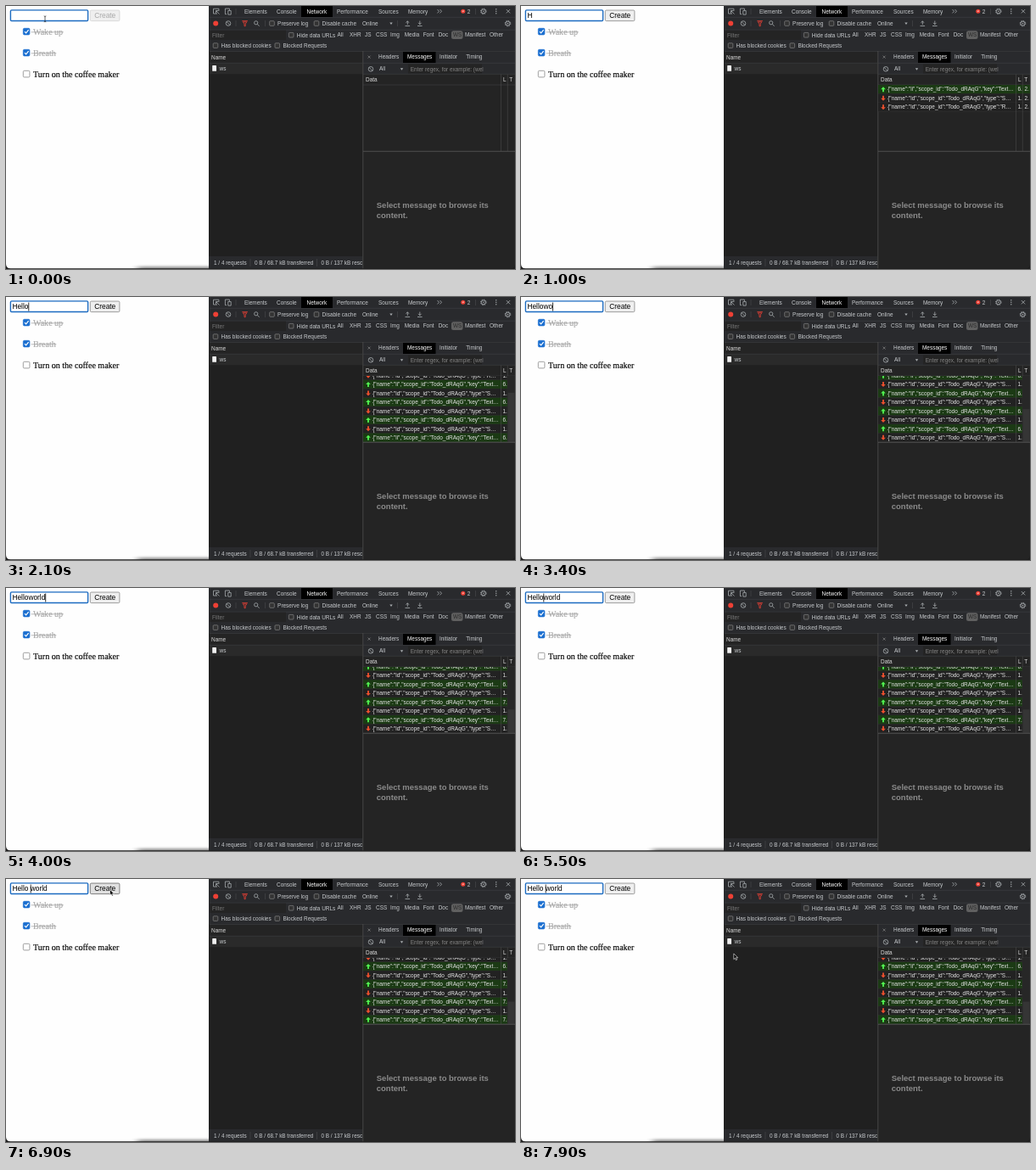
Write an HTML page that moves like this. It is 600 px wide and 310 px high and loops after 8000 ms.

```html
<!DOCTYPE html>
<html lang="en">
<head>
<meta charset="utf-8">
<title>Todo list with socket inspector</title>
<style>
html, body { margin: 0; width: 100%; height: 100%; overflow: hidden; background: #fff; }
svg { display: block; width: 600px; height: 310px; }
text { font-family: "Liberation Sans", Arial, sans-serif; white-space: pre; }
.serif { font-family: "Liberation Serif", Times, serif; }
</style>
</head>
<body>
<svg id="stage" viewBox="0 0 600 310">
  <defs>
    <clipPath id="listClip"><rect x="421" y="93" width="179" height="78"/></clipPath>
    <clipPath id="requestClip"><rect x="240" y="295" width="180" height="15"/></clipPath>
    <filter id="blur" x="-20%" y="-200%" width="140%" height="500%"><feGaussianBlur stdDeviation="4 1.8"/></filter>
  </defs>
</svg>
<script>
const LOOP = 8000, ROW = 10.45, LIST_TOP = 93, LIST_HEIGHT = 78, REPLY_DELAY = 80;
const TYPED = "Helloworld";
const KEY_TIMES = [500, 1600, 1700, 1900, 2100, 2900, 3300, 3850, 3880, 3915];
const LEFT_TIMES = [4700, 4800, 4900, 5200, 5500];
const SPACE_TIME = 5900;
const MOUSE = [[6500, 112, -1], [6700, 122.5, 12.5], [7000, 122.5, 12.5], [7700, 250.8, 88]];

const BAR = "#292a2d", PANE = "#242424", LINE = "#414245", ICON = "#a8acaf", TEXT = "#c8cbce";
const stage = document.getElementById("stage");

function add(tag, attrs, parent = stage) {
  const el = document.createElementNS("http://www.w3.org/2000/svg", tag);
  for (const key in attrs) el.setAttribute(key, attrs[key]);
  return parent.appendChild(el);
}
const rect = (x, y, width, height, fill, extra, parent) =>
  add("rect", { x, y, width, height, fill, ...extra }, parent);
const path = (d, stroke, extra, parent) =>
  add("path", { d, stroke, fill: "none", "stroke-width": .8, ...extra }, parent);
const circle = (cx, cy, r, extra) => add("circle", { cx, cy, r, ...extra });
function label(x, y, content, fill = TEXT, size = 6.45, extra, parent) {
  const el = add("text", { x, y, fill, "font-size": size, ...extra }, parent);
  el.textContent = content;
  return el;
}
const show = (el, on) => el.setAttribute("visibility", on ? "visible" : "hidden");

// Page with the todo list
rect(0, 0, 240, 310, "#fefefe");
rect(155, 307, 100, 8, "#000", { opacity: .4, filter: "url(#blur)" });
rect(5.4, 4.9, 91.2, 12.6, "#fff", { stroke: "#1b6ac0", "stroke-width": 1.4, rx: 1.2 });
const inputText = label(7.4, 14.2, "", "#000", 8.35);
const caret = rect(0, 6.5, .8, 10, "#000");
const button = rect(99.3, 5, 34.6, 12.6, "#efefef", { "stroke-width": .7, rx: 1.4 });
const buttonText = label(104.2, 14.2, "Create", "#000", 8.35);

function todo(y, content, strikeEnd) {
  const done = strikeEnd > 0, color = done ? "#a9a9a9" : "#000";
  rect(20.3, y - 3.7, 7.6, 7.6, done ? "#1b6fd0" : "#fff",
    { rx: 1.3, stroke: done ? "#1b6fd0" : "#767676", "stroke-width": .7 });
  label(32, y + 3.5, content, color, 10.04, { class: "serif", stroke: color, "stroke-width": .15 });
  if (!done) return;
  path(`M22 ${y + .2}l1.6 1.7 3-3.7`, "#fff", { "stroke-width": 1.2 });
  path(`M29.6 ${y + .8}H${strikeEnd}`, "#a0a0a0", { "stroke-width": .7 });
}
todo(30, "Wake up", 67.8);
todo(55, "Breath", 59.4);
todo(80, "Turn on the coffee maker", 0);

// Inspector panels
rect(239, 0, 361, 310, PANE);
rect(239, 0, 361, 53, BAR);
path("M240 13.3H600M240 28.2H600M240 53.5H600", LINE, { "stroke-width": .6 });
rect(239, 67.5, 181.5, 227.5, "#202020");
rect(240, 67.5, 180.5, 12.7, "#2a2a2a");
path("M240 67.3H420", LINE, { "stroke-width": .6 });
rect(239, 295, 181.5, 15, BAR);
rect(421, 54, 179, 26, BAR);
path("M421 67.3H600M421 80.3H600M421 93H600", LINE, { "stroke-width": .6 });
path("M420.8 53V310", "#505050");

// Main tabs
rect(348, 0, 37, 13, "#000");
[[281, "Elements"], [319, "Console"], [354.5, "Network"], [390, "Performance"],
 [439, "Sources"], [474, "Memory"]].forEach(([x, name]) =>
  label(x, 8.5, name, name === "Network" ? "#fff" : TEXT));

path("M249 9h-4.5V3.2h6.4V6M247.5 5.5l4 4M247.5 5.5v3M247.5 5.5h3", ICON);
path("M260 9.6h-1.6V3h5v2M261.8 5.5h3.4v4.6h-3.4z", ICON);
path("M271 3v7M271 17v7M305.5 17v7M461.5 17v7M553.5 3v7", "#4a4b4e", { "stroke-width": .6 });
path("M508.5 4l2 2.2-2 2.2M511.5 4l2 2.2-2 2.2", ICON);
circle(538.8, 6.2, 2.5, { fill: "#ee4035" });
path("M537.9 5.3l1.8 1.8M539.7 5.3l-1.8 1.8", "#fff", { "stroke-width": .5 });
label(543.7, 8.5, "2");
for (const y of [3.8, 6.3, 8.8]) circle(577.8, y, .7, { fill: ICON });
path("M589.8 4l4.4 4.4M594.2 4l-4.4 4.4", ICON);

function gear(x, y) {
  circle(x, y, 2.5, { fill: "none", stroke: ICON, "stroke-width": .9 });
  circle(x, y, 3.3, { fill: "none", stroke: ICON, "stroke-width": .9, "stroke-dasharray": "1.3 1.29" });
  circle(x, y, .8, { fill: ICON });
}
gear(562.8, 6.3);
gear(591.5, 20.6);

function blocked(x, y) {
  circle(x, y, 2.8, { fill: "none", stroke: ICON, "stroke-width": .8 });
  path(`M${x - 2} ${y - 2}l4 4`, ICON);
}
function checkOption(x, y, content) {
  rect(x - 2.8, y - 2.8, 5.6, 5.6, "#333", { stroke: "#949494", "stroke-width": .6, rx: .9 });
  label(x + 6.6, y + 2.3, content);
}
const dropMark = (x, y) => add("path", { d: `M${x - 1.7} ${y - 1}h3.4l-1.7 2.4z`, fill: ICON });

// Network toolbar
circle(247.2, 20.5, 3, { fill: "#ee4035" });
blocked(262, 20.5);
path("M278.3 17.6h6.6M279.3 18.9h4.6l-1.7 2v2.8h-1.2v-2.8z", "#ee4035");
circle(294.7, 19.8, 2.1, { fill: "none", stroke: ICON, "stroke-width": .8 });
path("M296.3 21.4l2.3 2.4", ICON);
checkOption(313.5, 20.5, "Preserve log");
checkOption(366, 20.5, "Disable cache");
label(420, 22.8, "Online");
dropMark(454, 20.5);
path("M470.5 23.5h5.6M473.3 22v-4M471.6 19.7l1.7-2 1.7 2", ICON);
path("M485 23.5h5.6M487.8 17.5v4M486.1 19.8l1.7 2 1.7-2", ICON);

// Filter bar
rect(240, 28.6, 90, 11.4, "#242424");
label(243, 36.6, "Filter", "#777");
checkOption(336.2, 34.2, "Hide data URLs");
rect(525, 29.3, 13.5, 9.6, "#606060", { rx: 2.5 });
[[390.5, "All"], [405, "XHR"], [423, "JS"], [436, "CSS"], [453, "Img"], [469.7, "Media"],
 [491.7, "Font"], [509.7, "Doc"], [527, "WS"], [541, "Manifest"], [570, "Other"]].forEach(([x, name]) =>
  label(x, 36.4, name, name === "WS" ? "#2a2a2a" : TEXT));
checkOption(247, 46.6, "Has blocked cookies");
checkOption(319.8, 46.6, "Blocked Requests");

// Request list
label(242, 62.8, "Name", "#dcdcdc");
rect(243.2, 70, 4.8, 6.8, "#f2f2f2", { rx: .4 });
label(251.5, 75.6, "ws");
const status = add("g", { "clip-path": "url(#requestClip)" });
[[245, "1 / 4 requests"], [293, "0 B / 68.7 kB transferred"], [371.5, "0 B / 137 kB resc"]]
  .forEach(([x, content]) => label(x, 304.7, content, TEXT, 6.4, {}, status));
path("M288 298v9M366.5 298v9", "#4a4b4e", { "stroke-width": .6 });

// Message pane
rect(468, 54, 38.5, 13, "#000");
path("M426.6 58.6l3 3M429.6 58.6l-3 3", "#8a8a8a", { "stroke-width": .7 });
[[439, "Headers"], [473, "Messages"], [511, "Initiator"], [542.3, "Timing"]].forEach(([x, name]) =>
  label(x, 62.3, name, name === "Messages" ? "#fff" : TEXT));
blocked(430, 74.3);
label(440, 76.4, "All");
dropMark(466.5, 74.3);
rect(474, 68.5, 87, 11, "#242424");
label(476.8, 76.6, "Enter regex, for example: (wel", "#858585");
label(424, 89.2, "Data", "#dcdcdc");
label(586, 89.2, "L", "#dcdcdc");
label(593.3, 89.2, "T", "#dcdcdc");

const list = add("g", {}, add("g", { "clip-path": "url(#listClip)" }));
const rows = [];
function addRow(sent, ending, size) {
  const y = LIST_TOP + ROW * rows.length, mid = y + ROW / 2;
  const row = add("g", {}, list);
  rect(421, y, 179, ROW, sent ? "#1b3a14" : "#222", {}, row);
  path(`M421 ${y + ROW}H600`, "#363636", { "stroke-width": .5 }, row);
  const color = sent ? "#52f552" : "#f0502e", dir = sent ? 1 : -1;
  add("path", { d: `M427 ${mid - 3 * dir}l2.8 ${3 * dir}h-1.9v${3 * dir}h-1.8v${-3 * dir}h-1.9z`, fill: color }, row);
  label(432.2, mid + 2.2, `{"name":"${sent ? "li" : "ld"}","scope_id":"Todo_dRAqG",${ending}…`, "#e4e4e4", 6.48, {}, row);
  label(585.4, mid + 2.2, size, "#e4e4e4", 6.45, {}, row);
  label(593.4, mid + 2.2, "2.", "#e4e4e4", 6.45, {}, row);
  rows.push(row);
}
for (let n = 1; n <= TYPED.length + 1; n++) {
  addRow(true, '"key":"Text', n > 8 ? "7." : "6.");
  if (n <= TYPED.length) addRow(false, '"type":"S', "1.");
  if (n === 1) addRow(false, '"type":"R', "1.");
}
path("M583.5 80.5V171M591.3 80.5V171", "#4a4a4a", { "stroke-width": .6 });
const scrollbar = add("g");
rect(591, LIST_TOP, 9, LIST_HEIGHT, "#272727", {}, scrollbar);
const thumb = rect(591.5, 0, 8, 0, "#353535", {}, scrollbar);
path("M421 171.3H600", "#5a5a5a");
for (const [y, content] of [[238.3, "Select message to browse its"], [249.8, "content."]])
  label(436.8, y, content, "#8b8b8b", 9.47, { "font-weight": "bold" });

// Rounded lower edge of the window
add("path", { d: "M0 304q0 5.3 5.3 5.3H594.7q5.3 0 5.3-5.3V310H0z", fill: "#1c1c1c" });

const beam = path("M44.7 11.8q1.3 0 1.3 1q0-1 1.3-1M46 12.8v5M44.7 18.8q1.3 0 1.3-1q0 1 1.3 1", "#222", { "stroke-width": .7 });
const arrow = add("path", { d: "M0 0v6.6l1.5-1.4 1.1 2.4 1.2-.5-1.1-2.4h2.1z", fill: "#000", stroke: "#fff", "stroke-width": .6 });

const passed = (times, t) => times.filter(time => time <= t).length;

function mouseAt(t) {
  for (let i = 1; i < MOUSE.length; i++) {
    const [t0, x0, y0] = MOUSE[i - 1], [t1, x1, y1] = MOUSE[i];
    if (t > t1) continue;
    const p = Math.max(0, (t - t0) / (t1 - t0)), e = p * p * (3 - 2 * p);
    return [x0 + (x1 - x0) * e, y0 + (y1 - y0) * e];
  }
  return MOUSE[MOUSE.length - 1].slice(1);
}

function render(t) {
  const keys = passed(KEY_TIMES, t), lefts = passed(LEFT_TIMES, t), spaced = t >= SPACE_TIME;
  const content = spaced ? "Hello world" : TYPED.slice(0, keys);
  const position = keys - lefts + spaced;
  if (inputText.textContent !== content) inputText.textContent = content;
  const offset = position ? inputText.getSubStringLength(0, position) : 0;
  caret.setAttribute("x", 7.4 + offset);
  const lastAction = Math.max(100, ...[...KEY_TIMES, ...LEFT_TIMES, SPACE_TIME].filter(time => time <= t));
  show(caret, t >= 100 && (t - lastAction) % 1000 < 500);

  const replies = passed(KEY_TIMES, t - REPLY_DELAY);
  const count = keys + replies + (replies > 0) + spaced;
  rows.forEach((row, i) => show(row, i < count));
  const height = count * ROW, overflow = Math.max(0, height - LIST_HEIGHT);
  list.setAttribute("transform", `translate(0 ${-overflow})`);
  show(scrollbar, overflow > 0);
  if (overflow > 0) {
    const length = LIST_HEIGHT * LIST_HEIGHT / height;
    thumb.setAttribute("y", LIST_TOP + LIST_HEIGHT - length);
    thumb.setAttribute("height", length);
  }

  const [x, y] = mouseAt(t), moving = t >= MOUSE[0][0];
  const hover = moving && x > 99 && x < 134 && y > 5 && y < 18;
  show(beam, t < KEY_TIMES[0]);
  show(arrow, moving);
  arrow.setAttribute("transform", `translate(${x} ${y})`);
  button.setAttribute("fill", hover ? "#e0e0e0" : "#efefef");
  button.setAttribute("stroke", !keys ? "#cfcfcf" : hover ? "#4f4f4f" : "#767676");
  buttonText.setAttribute("fill", keys ? "#000" : "#a8a8a8");
}

const start = performance.now();
function frame() {
  render((performance.now() - start) % LOOP);
  requestAnimationFrame(frame);
}
frame();
</script>
</body>
</html>
```
